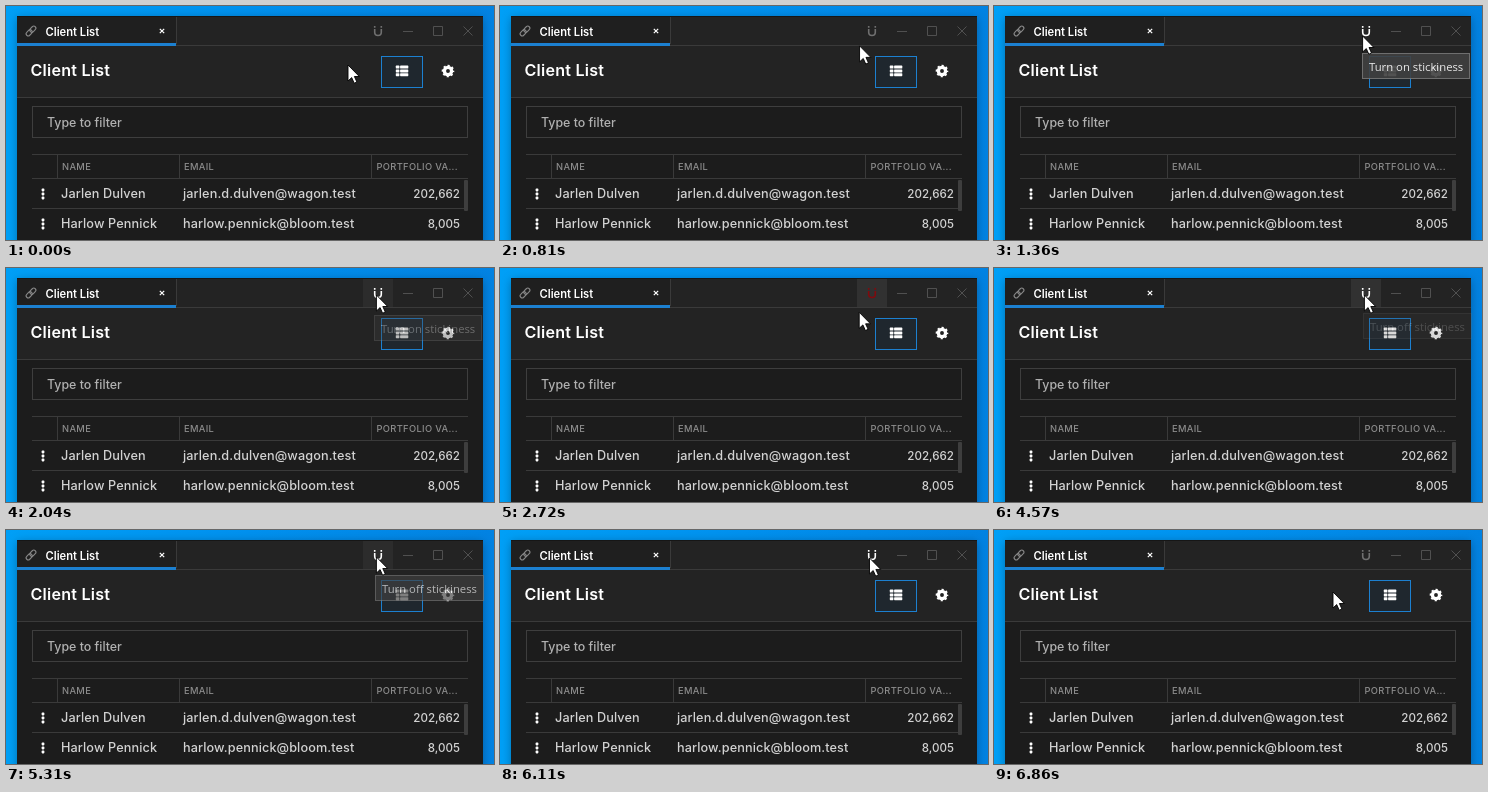
Animation, 488 px wide and 234 px high, one loop 7460 ms. Source, as an HTML page:

```html
<!DOCTYPE html>
<html lang="en">
<head>
<meta charset="utf-8">
<title>Client List</title>
<style>
  html, body { margin: 0; width: 100%; height: 100%; overflow: hidden; background: #1d1d1d; }
  svg { display: block; width: 488px; height: 234px; }
  text { font-family: Inter, "Open Sans", sans-serif; font-weight: 500; white-space: pre; }
  .title { font-weight: 600; fill: #fff; }
  .head { font-size: 9.3px; letter-spacing: .35px; fill: #8c8c8c; }
  .cell { font-size: 12.7px; letter-spacing: .1px; fill: #d2d2d2; }
  .num { font-size: 11.6px; letter-spacing: 0; text-anchor: end; }
  .tip text { font: 11.3px "Open Sans", "Noto Sans", sans-serif; fill: #fff; }
  .tip rect { fill: #404040; stroke: #777; }
  .line { fill: none; stroke: #3a3a3a; }
</style>
</head>
<body>
<svg viewBox="0 0 488 234">
  <defs>
    <linearGradient id="sky">
      <stop offset="0" stop-color="#009ff6"/>
      <stop offset=".5" stop-color="#0090ee"/>
      <stop offset="1" stop-color="#0282e2"/>
    </linearGradient>
    <filter id="shadow" x="-10%" y="-10%" width="120%" height="120%">
      <feDropShadow dx="0" dy="2" stdDeviation="5" flood-opacity=".3"/>
    </filter>
    <g id="dots" fill="#fff">
      <rect x="-1.4" y="-5.4" width="2.8" height="2.8" rx=".8"/>
      <rect x="-1.4" y="-1.4" width="2.8" height="2.8" rx=".8"/>
      <rect x="-1.4" y="2.6" width="2.8" height="2.8" rx=".8"/>
    </g>
    <g id="row" fill="#fff">
      <rect width="3.6" height="3" rx=".6"/>
      <rect x="4.3" width="8.2" height="3" rx=".6"/>
    </g>
  </defs>

  <rect width="488" height="234" fill="url(#sky)"/>
  <rect x="11" y="10" width="466" height="240" fill="#1d1d1d" filter="url(#shadow)"/>
  <rect x="11" y="10" width="466" height="82" fill="#232323"/>
  <rect x="11" y="10" width="159" height="28" fill="#1f1f1f"/>
  <path class="line" d="M170.5 10V38M170 39.5H477M11 91.5H477"/>
  <rect x="11" y="37" width="159" height="3" fill="#1c80d0"/>
  <path d="M11 10.5H477" stroke="#161616"/>

  <g transform="rotate(-45 25 25)" fill="none" stroke="#888" stroke-width="1.1">
    <rect x="19" y="22.9" width="6.8" height="4.2" rx="2.1"/>
    <rect x="24.2" y="22.9" width="6.8" height="4.2" rx="2.1"/>
  </g>
  <text class="title" x="39.5" y="30" font-size="11.2">Client List</text>
  <path d="M153.8 22.8l4.4 4.4m0-4.4l-4.4 4.4" stroke="#fff" stroke-width="1.2"/>

  <rect id="held" x="357" y="11" width="30" height="28" fill="#313131"/>
  <path id="magnet" d="M368.7 20V21.8M375.3 20V21.8M368.7 23V26.2a3.3 3.3 0 0 0 6.6 0V23" fill="none" stroke-width="1.6"/>
  <path d="M397 25.5H407M427.5 20.5h9v9h-9zM457.5 20.5l9 9m0-9l-9 9" fill="none" stroke="#505050"/>

  <text class="title" x="24.5" y="70" font-size="16.1" letter-spacing=".22">Client List</text>
  <rect x="375.5" y="50.5" width="41" height="31" fill="#1f272e" stroke="#1c80d0"/>
  <use href="#row" x="389.8" y="59.6"/>
  <use href="#row" x="389.8" y="63.4"/>
  <use href="#row" x="389.8" y="67.2"/>
  <g fill="none" stroke="#fff">
    <circle cx="442" cy="65" r="3.6" stroke-width="3.3"/>
    <circle cx="442" cy="65" r="5.4" stroke-width="1.8" stroke-dasharray="2.12" stroke-dashoffset="1.06"/>
  </g>

  <rect x="26.5" y="100.5" width="435" height="31" fill="none" stroke="#3e3e3e"/>
  <text x="41" y="121" font-size="12.4" fill="#b0b0b0">Type to filter</text>

  <path class="line" d="M26 148.5H462M26 172.5H462M26 202.5H458M51.5 149V172M173.5 149V172M365.5 149V172"/>
  <text class="head" x="56" y="164">NAME</text>
  <text class="head" x="178" y="164">EMAIL</text>
  <text class="head" x="370.5" y="164">PORTFOLIO VA...</text>
  <rect x="458" y="174" width="4" height="31" rx="1" fill="#3e3e3e"/>
  <g id="rows"></g>

  <g class="tip" id="tipOn">
    <rect x="368.5" y="47.5" width="107" height="25"/>
    <text x="375" y="65">Turn on stickiness</text>
  </g>
  <g class="tip" id="tipOff">
    <rect x="369.5" y="45.5" width="108" height="25"/>
    <text x="376" y="63">Turn off stickiness</text>
  </g>
  <path id="cursor" d="M0 0V16L3.7 12.6L6.2 18.2L8.9 17L6.4 11.5H11.3Z" fill="#fff" stroke="#000" stroke-width=".9"/>
</svg>
<script>
const LOOP = 7460, STEP = 70;
const $ = id => document.getElementById(id);

const clients = [
  ["Jarlen Dulven", "jarlen.d.dulven@wagon.test", "202,662"],
  ["Harlow Pennick", "harlow.pennick@bloom.test", "8,005"]
];
$("rows").innerHTML = clients.map(([name, email, value], i) => {
  const y = 192 + i * 30;
  return `<use href="#dots" x="37" y="${y - 4}"/>
    <text class="cell" x="55" y="${y}">${name}</text>
    <text class="cell" x="177" y="${y}">${email}</text>
    <text class="cell num" x="454" y="${y}">${value}</text>`;
}).join("");

// Pointer moves: start time, number of steps, destination
const home = [342, 59];
const moves = [
  [390, 11, 368.6, 30],
  [1430, 4, 370.4, 27],
  [2510, 8, 345.5, 65.5],
  [3600, 10, 370, 29],
  [4360, 3, 370.4, 27],
  [6110, 8, 339, 60],
  [6860, 1, 339, 62]
];

// Stepped progress from 0 to 1
function ramp(t, start, steps, power = 1) {
  const n = Math.floor((t - start) / STEP) + 1;
  return Math.pow(Math.min(1, Math.max(0, n / steps)), power);
}

function pointer(t) {
  let [x, y] = home;
  for (const [start, steps, toX, toY] of moves) {
    const p = ramp(t, start, steps, 1.1);
    const e = p * p * (3 - 2 * p);
    x += (toX - x) * e;
    y += (toY - y) * e;
  }
  return [x, y];
}

function draw(t) {
  const [x, y] = pointer(t);
  const on = ramp(t, 1970, 3), off = ramp(t, 5310, 3);
  const hover = x > 357 && x < 387 && y < 39;
  const sticky = on > 0 && off === 0;
  $("cursor").setAttribute("transform", `translate(${x.toFixed(2)} ${y.toFixed(2)})`);
  $("held").setAttribute("opacity", on - off);
  $("magnet").setAttribute("stroke", hover ? "#fff" : sticky ? "#800a0e" : "#707070");
  $("tipOn").setAttribute("opacity", ramp(t, 1290, 3, 0.25) * (1 - on));
  $("tipOff").setAttribute("opacity", ramp(t, 4570, 3, 1.5) * (1 - off));
}

const begin = performance.now();
function tick() {
  draw((performance.now() - begin) % LOOP);
  requestAnimationFrame(tick);
}
tick();
</script>
</body>
</html>
```
